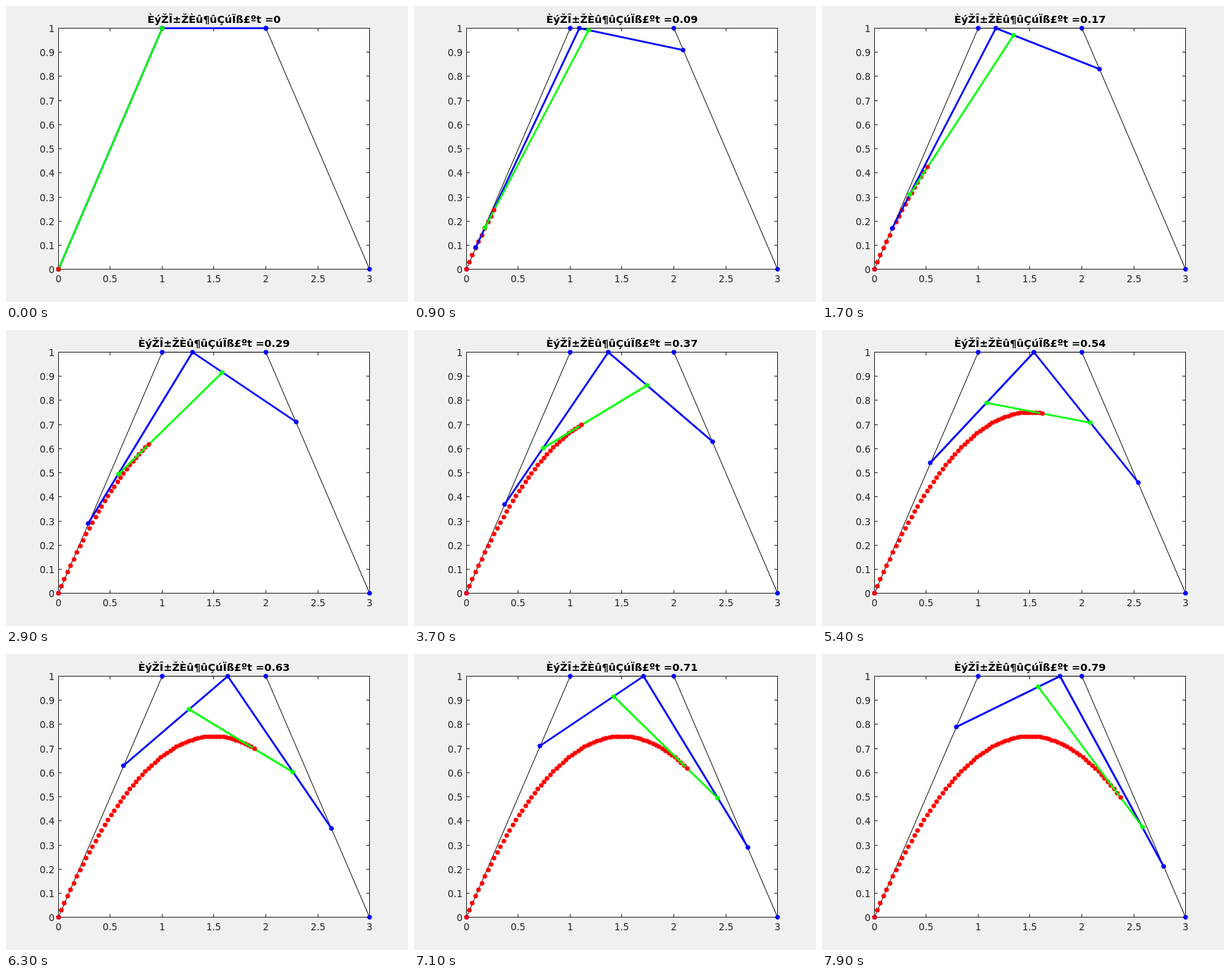
Write an HTML page with a canvas that moves like this. It is 570 px wide and 420 px high and loops after 8000 ms.

```html
<!DOCTYPE html>
<html>
<head>
<meta charset="utf-8">
<style>
html, body { margin: 0; height: 100%; overflow: hidden; background: #f0f0f0; }
canvas { display: block; }
</style>
</head>
<body>
<canvas id="stage" width="570" height="420"></canvas>
<script>
const ctx = document.getElementById("stage").getContext("2d");
const BLUE = "#00f", GREEN = "#0f0", RED = "#f00", INK = "#262626";
const STEP = 100, STEPS = 80;
const control = [[0, 0], [1, 1], [2, 1], [3, 0]];

// Data units to the centre of the nearest lower pixel
const px = x => Math.floor(74.1 + 147.25 * x) + 0.5;
const py = y => Math.floor(373.8 - 342.3 * y + 1e-6) + 0.5;

function line(points, color, width) {
  ctx.beginPath();
  for (const [x, y] of points) ctx.lineTo(px(x), py(y));
  ctx.strokeStyle = color;
  ctx.lineWidth = width;
  ctx.stroke();
}

function dots(points, color) {
  ctx.fillStyle = color;
  for (const [x, y] of points) {
    ctx.beginPath();
    ctx.arc(px(x), py(y), 3.25, 0, 2 * Math.PI);
    ctx.fill();
  }
}

function text(str, x, y, align, font, color) {
  ctx.font = font + ' "DejaVu Sans", sans-serif';
  ctx.textAlign = align;
  ctx.fillStyle = color;
  ctx.fillText(str, x, y);
}

// One de Casteljau level
const blend = (points, t) => points.slice(1).map((p, i) =>
  p.map((v, k) => points[i][k] * (1 - t) + v * t));

const curve = t => [3 * t, 3 * t * (1 - t)];

function tick(x, y, dx, dy) {
  ctx.beginPath();
  ctx.moveTo(x, y);
  ctx.lineTo(x + dx, y + dy);
  ctx.stroke();
}

function axes() {
  const left = px(0), right = px(3), top = py(1), bottom = py(0);
  ctx.fillStyle = "#f0f0f0";
  ctx.fillRect(0, 0, 570, 420);
  ctx.fillStyle = "#fff";
  ctx.fillRect(left, top, right - left, bottom - top);
  ctx.strokeStyle = INK;
  ctx.lineWidth = 1;
  ctx.strokeRect(left, top, right - left, bottom - top);
  for (let i = 0; i <= 6; i++) {
    const x = px(i / 2);
    tick(x, bottom, 0, -4.5);
    tick(x, top, 0, 4.5);
    text(i / 2, x, 392, "center", "13.33px", INK);
  }
  for (let i = 0; i <= 10; i++) {
    const y = py(i / 10);
    tick(left, y, 4.5, 0);
    tick(right, y, -4.5, 0);
    text(i / 10, 69, y + 5, "right", "13.33px", INK);
  }
}

function draw(n) {
  const t = n / 100;
  const outer = blend(control, t), inner = blend(outer, t);
  axes();
  text("ÈýŽÎ±ŽÈû¶ûÇúÏß£ºt =" + t, 295, 24, "center", "bold 14.67px", "#000");
  line(control, "#000", 1);
  dots(control, BLUE);
  dots(Array.from({ length: n }, (_, i) => curve(i / 100)), RED);
  line(outer, BLUE, 2.67);
  dots(outer, BLUE);
  line(inner, GREEN, 2.67);
  dots(inner, GREEN);
  dots([curve(t)], RED);
}

ctx.lineJoin = "round";
const start = performance.now();
function frame() {
  draw(Math.floor((performance.now() - start) / STEP) % STEPS);
  requestAnimationFrame(frame);
}
frame();
</script>
</body>
</html>
```
